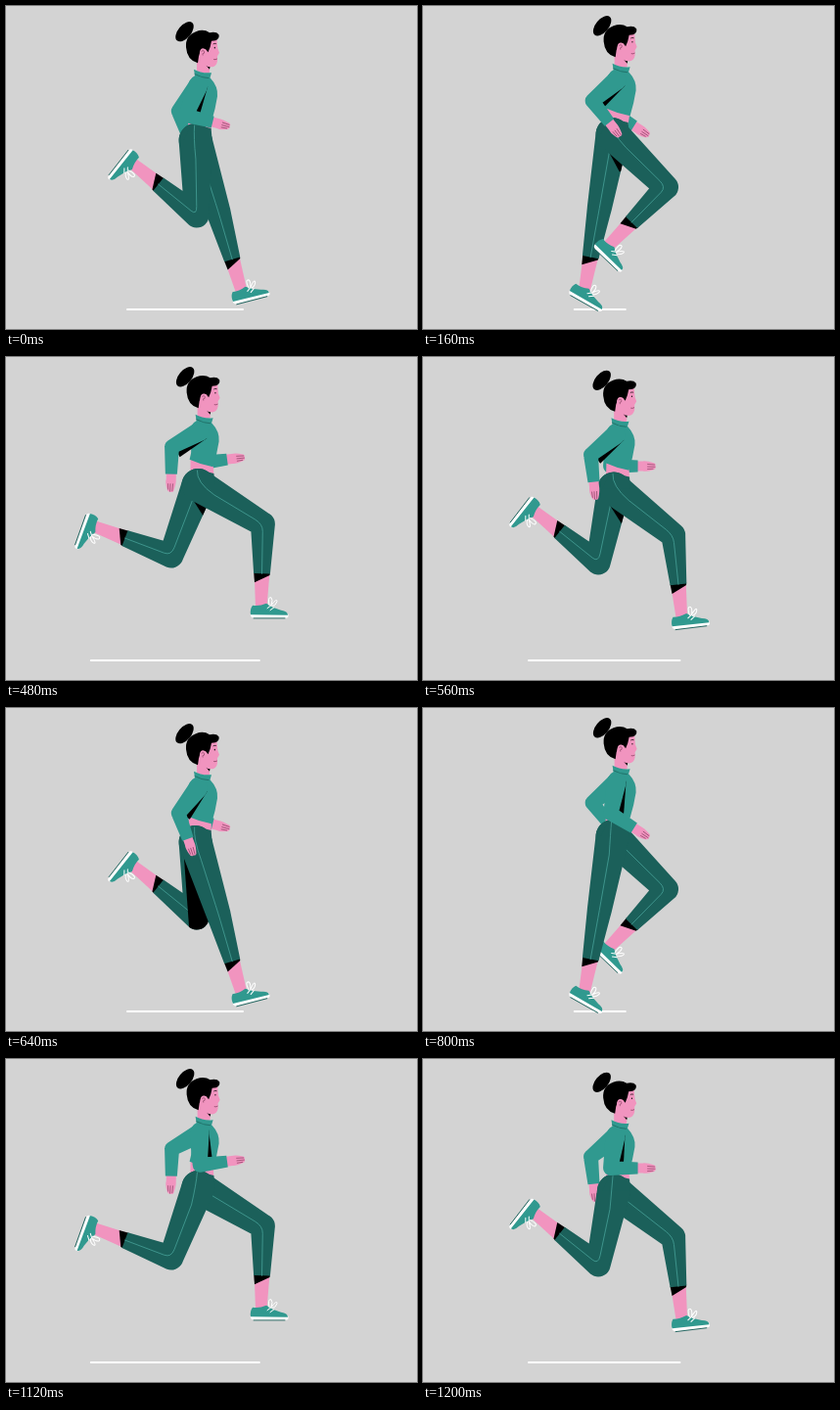
An HTML page with a canvas for the animation above (1280 ms loop, 420x330 px).

```html
<!DOCTYPE html>
<html lang="en">
<head>
<meta charset="utf-8">
<title>Runner</title>
<style>
  html, body { margin: 0; width: 100%; height: 100%; overflow: hidden; background: #d3d3d3; }
  canvas { display: block; width: 420px; height: 330px; }
</style>
</head>
<body>
<canvas id="stage" width="420" height="330"></canvas>
<script>
const ctx = document.getElementById('stage').getContext('2d');
const STEP = 80, COUNT = 16, RAD = Math.PI / 180;
const BG = '#d3d3d3', SHIRT = '#30998f', PANTS = '#1b605a', SKIN = '#f194bf',
      STRIPE = '#47a198', INK = '#000', WHITE = '#fff', LINE = '#7b3556';

// Stride keys: phase, thigh and shin angle forward of straight down
const STRIDE = [
  [0, 17.7, 16.3], [2, -10, -10.3], [4, -35, -53.4], [6, -21, -110.7],
  [8, 1, -129], [10, 45.5, -44.5], [12, 64, -23], [14, 59, -1], [15, 52, 6]
];

const pt = (x, y) => ({ x, y });
const mix = (a, b, k) => pt(a.x + (b.x - a.x) * k, a.y + (b.y - a.y) * k);
const swing = (p, len, deg) =>
  pt(p.x + len * Math.sin(deg * RAD), p.y + len * Math.cos(deg * RAD));

// Smooth closed curve through the stride keys
function stride(t, col) {
  const size = STRIDE.length;
  const key = i => {
    const k = STRIDE[(i + size) % size];
    return pt(k[0] + Math.floor(i / size) * COUNT, k[col]);
  };
  let i = size - 1;
  while (STRIDE[i][0] > t) i--;
  const [a, b, c, d] = [-1, 0, 1, 2].map(n => key(i + n));
  const w = c.x - b.x, k = (t - b.x) / w;
  const m0 = (c.y - a.y) / (c.x - a.x) * w, m1 = (d.y - b.y) / (d.x - b.x) * w;
  const ease = k * k * (3 - 2 * k);
  return b.y + (c.y - b.y) * ease + k * (1 - k) * ((1 - k) * m0 - k * m1);
}

function legPose(t, hip) {
  const shin = stride(t, 2);
  const knee = swing(hip, 77, stride(t, 1));
  const push = 20 * Math.exp(-((t - 2) ** 2) / 2);
  return { knee, ankle: swing(knee, 79, shin), foot: push - 1 - shin };
}

function armPose(t, shoulder) {
  const a = t / COUNT * 2 * Math.PI, c = Math.cos(a), s = Math.sin(a);
  const fore = 48 + 28 * c - 42 * s;
  const elbow = swing(shoulder, 32, -30 + 8 * c - 36 * s);
  return { shoulder, elbow, wrist: swing(elbow, 28, fore), hand: 90 - fore };
}

// Direction u and clockwise normal n of a segment
function axes(a, b) {
  const len = Math.hypot(b.x - a.x, b.y - a.y) || 1;
  const u = pt((b.x - a.x) / len, (b.y - a.y) / len);
  return { u, n: pt(-u.y, u.x), len };
}
const off = (p, ax, along, side) =>
  pt(p.x + ax.u.x * along + ax.n.x * side, p.y + ax.u.y * along + ax.n.y * side);

function trace(path, pts) {
  pts.forEach((p, i) => i ? path.lineTo(p.x, p.y) : path.moveTo(p.x, p.y));
}
function poly(color, ...pts) {
  const path = new Path2D();
  trace(path, pts);
  ctx.fillStyle = color;
  ctx.fill(path);
}
function fill(color, d) {
  ctx.fillStyle = color;
  ctx.fill(new Path2D(d));
}
function stroke(color, width, d) {
  ctx.strokeStyle = color;
  ctx.lineWidth = width;
  ctx.lineCap = ctx.lineJoin = 'round';
  ctx.stroke(new Path2D(d));
}
function ellipse(color, x, y, rx, ry, deg = 0) {
  ctx.fillStyle = color;
  ctx.beginPath();
  ctx.ellipse(x, y, rx, ry, deg * RAD, 0, Math.PI * 2);
  ctx.fill();
}
function placed(x, y, deg, draw) {
  ctx.save();
  ctx.translate(x, y);
  ctx.rotate(deg * RAD);
  draw();
  ctx.restore();
}

// Tapered limb: round at a and b, cut flat at c
function limb(a, ra, b, rb, c, rc) {
  const path = new Path2D();
  const ang = Math.atan2(b.y - a.y, b.x - a.x);
  const turn = Math.acos((ra - rb) / axes(a, b).len);
  path.arc(a.x, a.y, ra, ang + turn, ang - turn + Math.PI * 2);
  path.arc(b.x, b.y, rb, ang - turn, ang + turn);
  path.closePath();
  path.moveTo(b.x + rb, b.y);
  path.arc(b.x, b.y, rb, 0, Math.PI * 2);
  const ax = axes(b, c);
  trace(path, [off(b, ax, 0, rb), off(b, ax, 0, -rb), off(c, ax, 0, -rc), off(c, ax, 0, rc)]);
  path.closePath();
  return path;
}

function shoe() {
  fill(WHITE, 'M-11 12L27 12.5Q29 17 24 17L-8 17Q-12 16-11 12Z');
  fill(SHIRT, 'M-9 4Q-12 8-11 13.5L27 14Q27 10 20 9Q12 7 5 2Q-2 5-9 4Z');
  stroke(PANTS, 0.9, 'M-8 17.2L24 17.2');
  stroke(WHITE, 1, 'M8 4Q6-5 10-4Q12-2 10 4Q16-4 16 0Q15 4 11 5M6 7L10 4M9 9L13 6');
}

function leg({ knee, ankle, foot }, hip, near, shade) {
  const cuff = mix(knee, ankle, 0.64), ax = axes(knee, ankle);

  poly(SKIN, off(cuff, ax, 0, 7.8), off(cuff, ax, 0, -7.8),
       off(ankle, ax, 8, -5.5), off(ankle, ax, 8, 5.8));
  poly(INK, off(cuff, ax, -1, 8.3), off(cuff, ax, -1, -8.3),
       off(cuff, ax, 1.5, -8), off(cuff, ax, 9, 7.4));

  const cloth = limb(hip, 17, knee, 12.5, cuff, 8.4);
  ctx.fillStyle = PANTS;
  ctx.fill(cloth);
  if (near) {
    poly(PANTS, pt(hip.x - 3, hip.y - 16.7), pt(hip.x + 16, hip.y - 12),
         pt(hip.x + 17, hip.y), pt(hip.x - 12, hip.y));
  }

  const start = mix(hip, knee, 0.2), first = mix(hip, knee, 0.25);
  const bend = mix(knee, hip, 0.12), low = mix(knee, cuff, 0.15);
  const from = near
    ? `M${hip.x - 1} ${hip.y - 15}Q${hip.x - 2} ${hip.y - 3} `
    : `M${start.x} ${start.y}L`;
  stroke(STRIPE, 0.8, `${from}${first.x} ${first.y}L${bend.x} ${bend.y}` +
    `Q${knee.x} ${knee.y} ${low.x} ${low.y}L${cuff.x} ${cuff.y}`);

  if (shade) {
    ctx.save();
    ctx.clip(cloth);
    poly(INK, ...shade);
    ctx.restore();
  }
  placed(ankle.x, ankle.y, foot, shoe);
}

// Dark wedge the near thigh casts on the far one
function wedge(hip, front, back) {
  const gap = front.x - back.x;
  if (gap < 10) return null;
  const k = Math.max(0, Math.min(1, (70 - gap) / 49));
  const top = pt(hip.x - 4 - 8 * k, hip.y + 17 - 3 * k);
  const end = mix(pt(hip.x + 8, hip.y + 36), pt(back.x - 8, back.y + 14), k);
  return [top, end, pt(end.x + 26, end.y + 2), front, hip];
}

function hand() {
  fill(SKIN, 'M-3-5L5-5Q9-5.5 17-3Q19-2 18 0Q19 3 15 4Q9 6 5 5L-3 5Z');
  stroke(LINE, 0.6, 'M10-2L17-1.4M10 .6L17.5 .8M10 3L15.5 2.8');
}

function arm({ shoulder, elbow, wrist, hand: turn }, near) {
  if (near) {
    const ax = axes(shoulder, elbow);
    poly(INK, off(shoulder, ax, -4, -9.5), off(elbow, ax, -2, -13), off(elbow, ax, -2, -6));
  }
  placed(wrist.x, wrist.y, turn, hand);
  ctx.fillStyle = SHIRT;
  ctx.fill(limb(shoulder, 10, elbow, 7.5, wrist, 6));
}

function torso() {
  fill(SHIRT, 'M192 64.5Q200 69 210 68L208.5 73Q217 82 216 92' +
    'Q214 105 210 118Q198 116 186 110.5Q190 97 187 82Q187 74 193 71Z');
  stroke(PANTS, 0.7, 'M193 69.5Q200 73.5 207 73.5');
}

function head() {
  ellipse(INK, 182.5, 26, 12, 6.6, -50);
  stroke(SHIRT, 1.6, 'M188.5 32L191 29');
  fill(SKIN, 'M195 50L195 66Q201 69 208 68L208 62Q215 63 216 56L216 51' +
    'L218 47.5L216.3 43L215.5 34L203 34Z');
  fill(INK, 'M184 42Q183 30 194 26Q202 23 208 27Q215 25.5 217.5 29' +
    'Q218.5 33 214 35L210 35.5Q209 42 206.5 47L204 44L199 45' +
    'L197 51L196 58Q185 55 184 42Z');
  ellipse(SKIN, 201.3, 47.6, 3.4, 4.4, 10);
  stroke(LINE, 0.6, 'M200 46Q203 44 202.5 48Q200 48 201 50');
  stroke(INK, 0.7, 'M212 38.5Q213 37.7 214.5 38.3');
  ellipse(INK, 213.3, 42.5, 0.6, 0.8);
  stroke(LINE, 0.7, 'M212.5 54.5Q214 55 215.5 54');
  fill(INK, 'M204.5 60.5Q206 62 208.5 62L208 64.5Z');
}

function draw(t) {
  const near = (t + 8) % COUNT;
  // the body and the ground line repeat with every footfall
  const a = t / 8 * 2 * Math.PI;
  const c = Math.cos(a), s = Math.sin(a), c2 = Math.cos(2 * a), s2 = Math.sin(2 * a);
  const dx = 1.6 - 1.6 * c, dy = -4.25 + 2.9 * c + 1.5 * c2;
  const hip = pt(195 - 1.4 * (c + s), 136.8 + dy);
  const mid = 172.4 + 15 * c + 4 * s - 4.4 * c2 - 5 * s2;
  const half = 61 - 7 * c - 30 * s + 5 * c2;

  const shoulder = pt(196 + dx, 82 + dy);
  const farLeg = legPose(t, hip), nearLeg = legPose(near, hip);

  ctx.fillStyle = BG;
  ctx.fillRect(0, 0, 420, 330);
  stroke(WHITE, 2, `M${mid - half} 310L${mid + half} 310`);

  arm(armPose(near, shoulder), false);
  poly(SKIN, pt(187 + dx, 108 + dy), pt(210 + dx, 114 + dy),
       pt(hip.x + 16, hip.y - 10), pt(hip.x - 8, hip.y - 10));
  leg(farLeg, hip, false, wedge(hip, nearLeg.knee, farLeg.knee));
  leg(nearLeg, hip, true);
  placed(dx * 0.4, dy, 0, head);
  placed(dx, dy, 0, torso);
  arm(armPose(t, shoulder), true);
}

const start = performance.now();
function tick() {
  draw(Math.floor((performance.now() - start) / STEP) % COUNT);
  requestAnimationFrame(tick);
}
tick();
</script>
</body>
</html>
```
